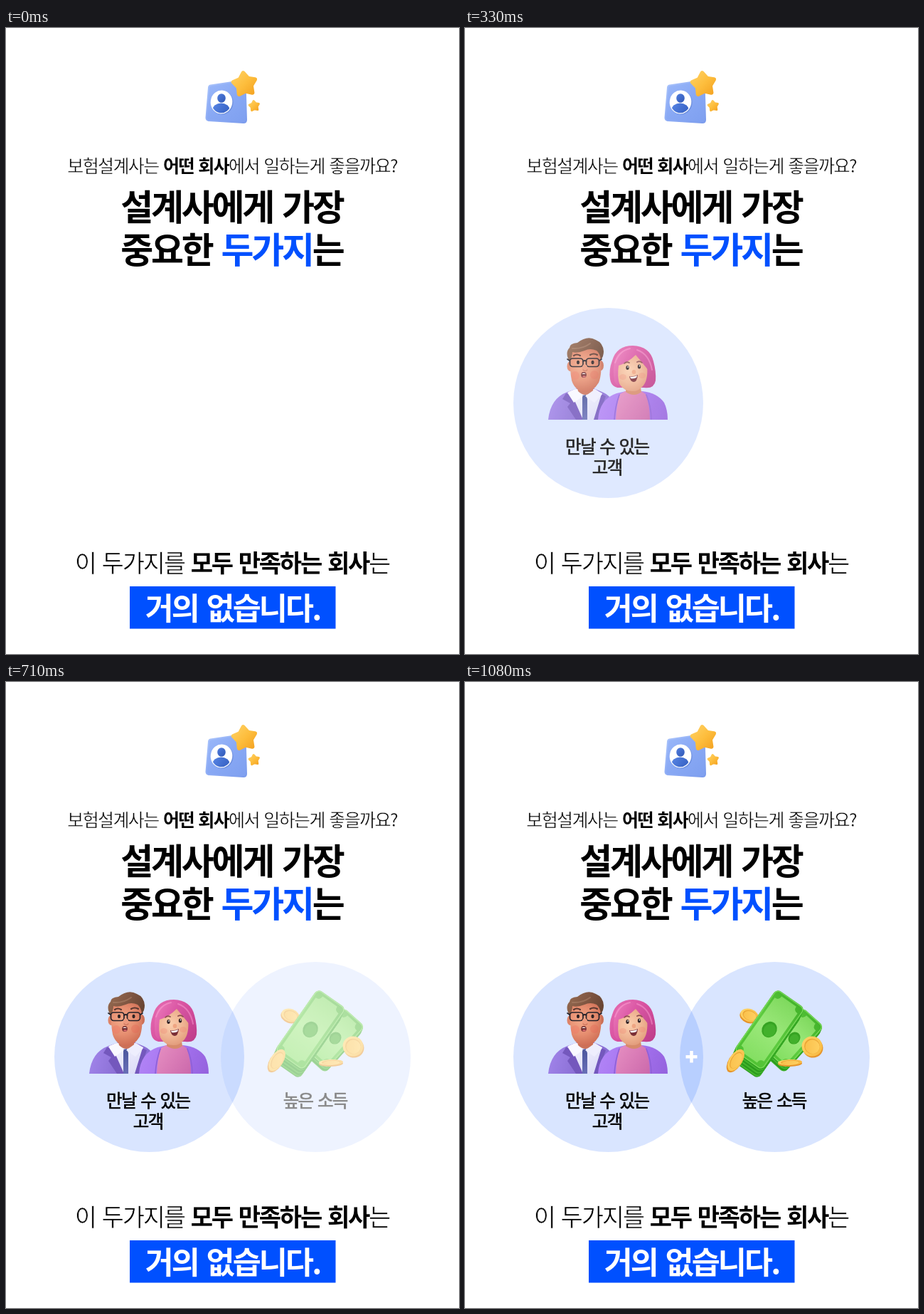
These frames come from a looping animation (637 px wide and 879 px high, 2440 ms). An HTML page with a canvas:

```html
<!DOCTYPE html>
<html lang="ko">
<head>
<meta charset="utf-8">
<title>설계사에게 가장 중요한 두가지</title>
<style>
html, body { margin: 0; width: 100%; height: 100%; overflow: hidden; background: #fff; }
canvas { display: block; }
</style>
</head>
<body>
<canvas id="stage" width="637" height="879"></canvas>
<script>
const W = 637, H = 879, LOOP = 2440, STEP = 30;
const FONT = '"Noto Sans CJK KR", "Noto Sans KR", "Noto Sans CJK", sans-serif';
const BLUE = '#0050ff';
const stage = document.getElementById('stage').getContext('2d');
let g;

function layer(draw) {
  const c = document.createElement('canvas');
  c.width = W;
  c.height = H;
  g = c.getContext('2d');
  draw();
  return c;
}

function lin(x0, y0, x1, y1, ...colors) {
  const fill = g.createLinearGradient(x0, y0, x1, y1);
  colors.forEach((c, i) => fill.addColorStop(i / (colors.length - 1), c));
  return fill;
}

function rad(x, y, r, ...colors) {
  const fill = g.createRadialGradient(x, y, 0, x, y, r);
  colors.forEach((c, i) => fill.addColorStop(i / (colors.length - 1), c));
  return fill;
}

function shape(d, fill) {
  g.fillStyle = fill;
  g.fill(new Path2D(d));
}

function line(d, color, width) {
  g.strokeStyle = color;
  g.lineWidth = width;
  g.lineCap = g.lineJoin = 'round';
  g.stroke(new Path2D(d));
}

function oval(x, y, rx, ry, fill, turn = 0) {
  g.fillStyle = fill;
  g.beginPath();
  g.ellipse(x, y, rx, ry, turn, 0, Math.PI * 2);
  g.fill();
}

function box(x, y, w, h, r, fill) {
  g.fillStyle = fill;
  g.beginPath();
  g.roundRect(x, y, w, h, r);
  g.fill();
}

// Centred line made of [text, weight, colour] runs.
// Light and medium are regular glyphs trimmed or thickened by an outline.
function text(cx, y, size, ...runs) {
  const gap = -0.065 * size;
  const setFont = weight => {
    g.font = `${weight > 500 ? 700 : 400} ${size}px ${FONT}`;
    g.letterSpacing = gap + 'px';
    g.wordSpacing = 0.1 * size + 'px';
  };
  const widths = runs.map(([s, weight]) => {
    setFont(weight);
    return g.measureText(s).width;
  });
  let x = cx - (widths.reduce((a, b) => a + b, 0) - gap) / 2;
  runs.forEach(([s, weight, color = '#000'], i) => {
    setFont(weight);
    g.fillStyle = color;
    g.fillText(s, x, y);
    if (weight <= 500) {
      g.strokeStyle = weight < 400 ? '#fff' : color;
      g.lineWidth = size * (weight < 400 ? 0.02 : 0.028);
      g.lineJoin = 'round';
      g.strokeText(s, x, y);
    }
    x += widths[i];
  });
}

function star(cx, cy, r, round) {
  g.beginPath();
  for (let i = 0; i < 10; i++) {
    const a = (-97 + i * 36) * Math.PI / 180;
    const d = i % 2 ? r * 0.6 : r;
    g.lineTo(cx + d * Math.cos(a), cy + d * Math.sin(a));
  }
  g.closePath();
  g.lineJoin = 'round';
  g.lineWidth = round;
  g.fillStyle = g.strokeStyle = lin(cx - r, cy - r, cx + r, cy + r, '#ffd062', '#fdbd3c', '#f3a01f');
  g.fill();
  g.stroke();
}

function drawIcon() {
  const card = 'M286 84 Q286 82 288 81.5 L332 75 Q335 75 335.5 78 L337 129 Q337 132 334 132 L285 129 Q282.5 128.5 282.5 126Z';
  shape(card, '#7c9ff0');
  line(card, lin(282, 76, 338, 134, '#a9c3fb', '#8fadf5', '#7a9bec'), 4);
  shape(card, lin(285, 80, 332, 134, '#98b6f9', '#88a8f4', '#7fa0f0'));
  oval(304, 105, 15.5, 16.5, '#6e90df', 0.15);
  oval(303, 104, 15.3, 16.5, '#fff', 0.15);
  g.save();
  g.beginPath();
  g.ellipse(303, 104, 14, 15.3, 0.15, 0, 7);
  g.clip();
  oval(302.5, 115, 12, 9.5, lin(292, 106, 313, 120, '#5683e3', '#3560c2'));
  g.restore();
  oval(303, 98.5, 5.8, 6.3, lin(298, 93, 309, 104, '#4e7adb', '#3159b7'));
  star(335.5, 79, 16, 6);
  star(349, 109.5, 7, 3);
}

function drawMan() {
  shape('M117 550 Q120 520 144 511 L158 506 H181 L195 512 Q210 518 214 550Z',
    lin(118, 520, 205, 545, '#a184ea', '#8a6fd4', '#8a6fd6'));
  shape('M145 511 L156 507 H182 L193 513 L184 550 H164Z', lin(150, 510, 180, 550, '#f6f5ff', '#dcdcf7'));
  shape('M142 513 L150 514 L166 550 H156 L144 532 L148 527 L137 521Z', '#7458bd');
  shape('M192 514 L198 517 L194 528 L188 550 H181Z', '#7458bd');
  shape('M165 516 L170 515 L172 521 L172 550 H165 L165 522Z', lin(164, 515, 172, 550, '#4a559c', '#6a70b8'));
  shape('M157 498 H181 L180 510 Q169 520 159 510Z', '#cb7158');
  shape('M155 507 L166 517 L153 526 L144 512Z', '#f9f9ff');
  shape('M183 507 L169 517 L182 526 L193 514Z', '#eeeefd');
  oval(148, 475, 4.5, 7, '#de8468');
  oval(191, 474, 4, 7, '#cb6f56');
  shape('M148 460 Q150 446 170 446 Q190 446 191 461 Q193 486 188 498 Q180 511 169 511 Q155 510 150 495 Q147 480 148 460Z',
    rad(163, 476, 38, '#f3a888', '#e68e70', '#ca6850'));
  oval(155, 488, 6, 6, 'rgba(240,115,96,.35)');
  oval(182, 487, 6, 6, 'rgba(228,96,80,.3)');
  shape('M147 468 Q140 456 147 449 Q147 443 158 442 Q172 431 184 438 Q194 442 195 454 Q195 461 191 466 Q190 457 185 453 Q176 449 168 453 Q158 457 151 455 Q151 462 147 468Z',
    lin(147, 440, 193, 466, '#94694f', '#7e5541', '#64412f'));
  line('M151 450 Q165 451 176 443', 'rgba(175,133,107,.55)', 2);
  line('M153 460 Q157 457 162 460 M176 459 Q181 456 186 459', '#5a3830', 2.2);
  oval(159, 469.5, 2, 2.8, '#2e2224');
  oval(179.5, 469.5, 2, 2.8, '#2e2224');
  g.strokeStyle = '#25222a';
  g.lineWidth = 1.7;
  g.beginPath();
  g.roundRect(147.5, 464, 18.5, 11.5, 4);
  g.roundRect(170.5, 464, 18, 11.5, 4);
  g.stroke();
  line('M166 468 Q168.5 466 170.5 468 M147 467 L144 465 M189 467 L192 465', '#25222a', 1.7);
  oval(168.5, 477, 3.6, 4.4, '#ec9a7e');
  line('M166 480 Q169 483 172 480', '#cc745d', 1.2);
  oval(167, 487, 3.8, 4, '#702c30');
  shape('M164 486 Q167 483 170 486Z', '#fff3ed');
  oval(167.5, 489.3, 2.4, 1.4, '#d3666a');
}

function drawWoman() {
  shape('M204 493 Q202 480 207 467 Q213 446 236 446 Q260 447 265 468 Q269 483 268 495 Q266 507 252 505 H219 Q206 506 204 493Z',
    lin(205, 450, 267, 503, '#e66db2', '#d7509f', '#bd3c89'));
  shape('M187 550 Q189 521 213 513 L226 510 H249 Q270 512 280 526 Q285 536 285 550Z',
    lin(188, 518, 283, 550, '#b285f6', '#a573f0', '#9563de'));
  shape('M212 550 Q213 528 218 514 L225 510 H248 L254 514 Q260 530 260 550Z',
    lin(213, 516, 259, 548, '#e48dc0', '#d97bb6', '#cc6aac'));
  line('M217 515 Q211 532 210 550 M255 515 Q262 532 262 550', '#8f60d6', 1.6);
  shape('M227 498 H246 L248 511 Q238 519 226 511Z', '#d78b6b');
  shape('M213 478 Q214 456 235 455 Q254 456 256 474 Q258 494 250 503 Q243 511 235 510 Q224 510 218 501 Q213 493 213 478Z',
    rad(231, 481, 36, '#fbcfae', '#efb493', '#dc9070'));
  oval(222, 490, 5, 4, 'rgba(238,118,105,.25)');
  oval(249, 488, 5, 4, 'rgba(238,118,105,.25)');
  shape('M210 496 Q206 469 216 457 Q233 444 250 453 Q261 461 259 482 Q251 472 240 459 Q229 470 216 474 Q214 488 217 500 Q214 504 210 496Z',
    lin(210, 452, 259, 480, '#ec7cbb', '#db58a5', '#c84994'));
  line('M211 470 Q217 453 232 450 M242 452 Q259 458 263 480', 'rgba(255,165,215,.45)', 2);
  line('M224 471 Q227 468 231 470 M242 469 Q246 467 249 470', '#8c4d50', 1.7);
  oval(228.5, 477, 2.2, 3, '#302326');
  oval(245, 475.5, 2.2, 3, '#302326');
  oval(229, 476, .8, .9, '#fff');
  oval(245.5, 474.5, .8, .9, '#fff');
  oval(237.5, 483, 2.8, 3, '#efa582');
  shape('M231 489 Q237 490 243 487 Q242 497 237 497 Q232 496 231 489Z', '#7a2e36');
  shape('M232 489.5 Q237 490.5 242 488 L241 491 Q236 493 233 492Z', '#fff');
}

// Banknote whose long side lies along the local x axis.
function note(cx, cy, len, wide, deg, thick, hole) {
  const x = -len / 2, y = -wide / 2, m = 5, n = 7;
  const turn = deg * Math.PI / 180;
  const place = (d, draw) => {
    g.save();
    g.translate(cx - d * .45, cy + d);
    g.rotate(turn);
    draw();
    g.restore();
  };
  for (let d = thick; d > 0; d--) {
    place(d, () => box(x, y, len, wide, 7, d % 4 < 2 ? '#2a9a1c' : '#43b52d'));
  }
  place(0, () => {
    box(x, y, len, wide, 7, lin(x, y, -x, -y, '#4cbf30', '#5ecb40', '#40b028'));
    g.beginPath();
    g.roundRect(x + 1, y + 1, len - 2, wide - 2, 6);
    g.strokeStyle = '#7cdb5b';
    g.lineWidth = 1.2;
    g.stroke();
    const l = x + m, r = -x - m, t = y + m, b = -y - m;
    shape(`M${l + n} ${t} H${r - n} Q${r - n} ${t + n} ${r} ${t + n} V${b - n} Q${r - n} ${b - n} ${r - n} ${b} H${l + n} Q${l + n} ${b - n} ${l} ${b - n} V${t + n} Q${l + n} ${t + n} ${l + n} ${t}Z`,
      lin(l, 0, r, 0, '#84df62', '#9be87a', '#7fd95e'));
    oval(0, 0, hole, hole * .9, '#36a322');
    oval(-1, 1, hole - 2, hole * .9 - 2, '#42b02c');
  });
}

function coin(x, y, rx, ry, deg, dx, dy) {
  const turn = deg * Math.PI / 180;
  oval(x + dx, y + dy, rx, ry, '#e6942a', turn);
  oval(x, y, rx, ry, lin(x - rx, y - ry, x + rx, y + ry, '#ffd668', '#f8b840'), turn);
  oval(x, y, rx * .76, ry * .76, '#eba737', turn);
  oval(x + .6, y + .6, rx * .7, ry * .7, lin(x - rx, y, x + rx, y, '#f9bd47', '#ffd265'), turn);
}

function drawMoney() {
  coin(400, 468, 13, 9, 20, -1, 2);
  note(463, 500, 80, 41, -48, 6, 9);
  note(428, 488, 106, 49, -55, 12, 11.5);
  coin(488, 511.5, 14.5, 14, 20, 1, 2);
  coin(381, 531, 17, 9, -58, -1.5, 2);
  coin(457, 534, 17, 4, -2, 0, 2);
}

const disc = x => oval(x, 526.5, 133.5, 133.5, 'rgba(0,80,255,.15)');

const page = layer(() => {
  g.fillStyle = '#fff';
  g.fillRect(0, 0, W, H);
  drawIcon();
  text(319, 203, 25, ['보험설계사는 ', 300], ['어떤 회사', 700], ['에서 일하는게 좋을까요?', 300]);
  text(319, 270, 50, ['설계사에게 가장', 700]);
  text(319, 330, 50, ['중요한 ', 700], ['두가지', 700, BLUE], ['는', 700]);
  text(319, 764, 34, ['이 두가지를 ', 300], ['모두 만족하는 회사', 700], ['는', 300]);
  g.fillStyle = BLUE;
  g.fillRect(174, 784, 289.5, 59.5);
  text(320, 831, 43.5, ['거의 없습니다.', 700, '#fff']);
});

const clients = layer(() => {
  disc(201.5);
  g.save();
  g.beginPath();
  g.rect(117, 430, 168, 120);
  g.clip();
  drawMan();
  drawWoman();
  g.restore();
  text(200.5, 597, 24.5, ['만날 수 있는', 500]);
  text(200.5, 626, 24.5, ['고객', 500]);
});

const income = layer(() => {
  disc(435.5);
  drawMoney();
  text(435.5, 597, 24.5, ['높은 소득', 500]);
});

const plus = layer(() => {
  g.fillStyle = '#fff';
  g.fillRect(310.5, 524, 16, 4.5);
  g.fillRect(316.25, 518, 4.5, 16.5);
});

const fade = (ticks, count) => Math.max(0, Math.min(1, ticks / count));
const ticks = t => Math.floor(t / STEP);

function show(image, alpha) {
  stage.globalAlpha = alpha;
  stage.drawImage(image, 0, 0);
}

function render(t) {
  show(page, 1);
  show(clients, fade(ticks(t), 13));
  show(income, fade(ticks(t - 560) + 1, 13));
  show(plus, fade(ticks(t - 1050) + 1, 2));
}

let start;
function tick(now) {
  start ??= now;
  render((now - start) % LOOP);
  requestAnimationFrame(tick);
}
render(0);
requestAnimationFrame(tick);
</script>
</body>
</html>
```
